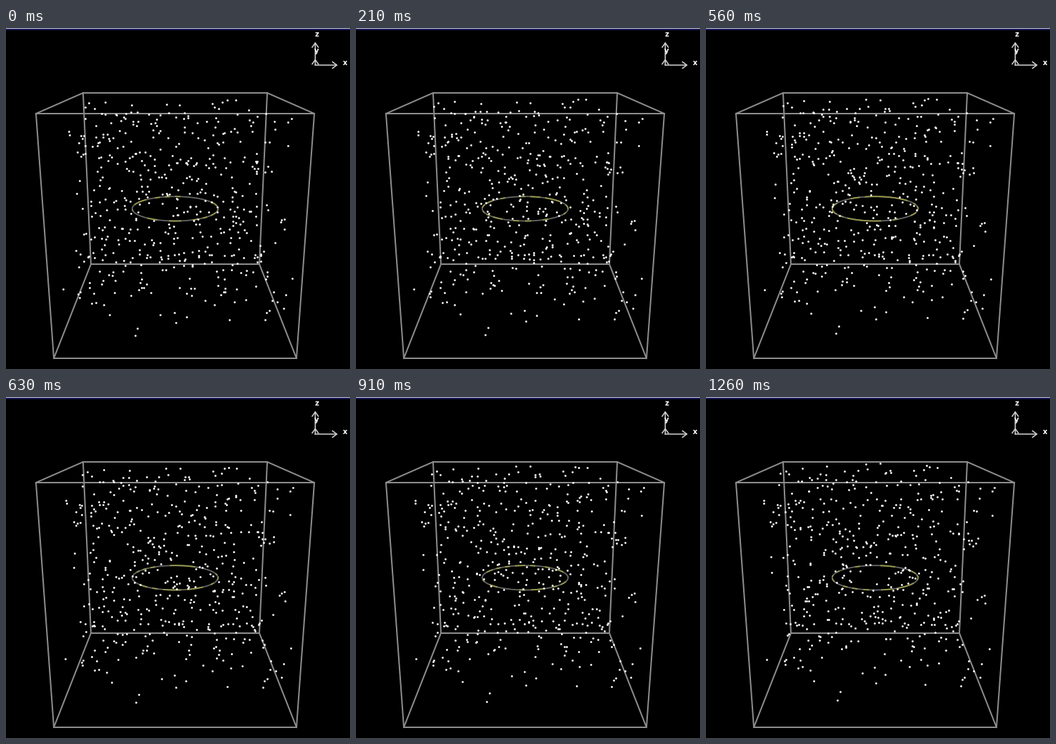
Animation of 482x478 px, one loop 1330 ms. Source, as a matplotlib script:

```python
import numpy as np
import matplotlib.pyplot as plt
from matplotlib.animation import FuncAnimation
from matplotlib.collections import LineCollection

W, H, DPI = 482, 478, 64
FRAMES, STEP_MS = 19, 70
COUNT = 500
RADIUS, STRENGTH, CORE = 0.204, 0.0115, 0.03
GREY, WHITE = "#8c8c8c", "#d4d4d4"
rng = np.random.default_rng(7)


def px(n):
    return n * 72 / DPI


def project(x, y, z):
    """Perspective of a unit cube centred on the origin, z upwards."""
    u, v = y + 0.5, 0.5 - z
    w = 0.002568 + 0.000369 * v + 0.001304 * u
    return 237 + x / w, (0.3081 + 1.052 * v + 0.043 * u) / w


# Ring of short current elements
phi = np.linspace(0, 2 * np.pi, 48, endpoint=False)
zero = np.zeros_like(phi)
ring = RADIUS * np.column_stack([np.cos(phi), np.sin(phi), zero])
ring_dl = RADIUS * phi[1] * np.column_stack([-np.sin(phi), np.cos(phi), zero])


def velocity(p):
    """Biot-Savart flow of the ring."""
    r = p[:, None] - ring
    d3 = ((r ** 2).sum(2) + CORE ** 2) ** 1.5
    return STRENGTH / (2 * np.pi) * (np.cross(ring_dl[None], r) / d3[..., None]).sum(1)


def advance(p, substeps=6):
    """One frame of Runge-Kutta steps."""
    h = 1 / substeps
    for _ in range(substeps):
        a = velocity(p)
        b = velocity(p + h / 2 * a)
        c = velocity(p + h / 2 * b)
        d = velocity(p + h * c)
        p = p + h / 6 * (a + 2 * b + 2 * c + d)
    return p


path = [rng.uniform((-0.48, -0.48, -0.44), (0.48, 0.48, 0.48), (COUNT, 3))]
for _ in range(FRAMES - 1):
    path.append(advance(path[-1]))

fig = plt.figure(figsize=(W / DPI, H / DPI), dpi=DPI, facecolor="black")
ax = fig.add_axes([0, 0, 1, 1])
ax.set(xlim=(0, W), ylim=(H, 0))
ax.axis("off")


def line(points, color=GREY, width=2):
    ax.plot(*zip(*points), color=color, lw=px(width),
            solid_joinstyle="miter", snap=False)


# Window edge along the top
ax.axhspan(0, 1, color="#c8c8d6", lw=0)
ax.axhspan(1, 3, color="#1c1c60", lw=0)

# Box
front = [(42, 120), (432, 120), (407, 463), (67, 463)]
back = [(108, 91), (366, 91), (355, 331), (119, 331)]
for face in (back, front):
    line(face + face[:1])
for edge in zip(front, back):
    line(edge)

# Axis triad
line([(433.3, 52), (433.3, 21)], WHITE, 1.5)
line([(433.3, 52), (463.5, 52)], WHITE, 1.5)
for tip in (21, 44.5):
    line([(429, tip + 6), (433.3, tip), (437.6, tip + 6)], WHITE, 1.5)
line([(457.5, 47.5), (463.5, 52), (457.5, 56.5)], WHITE, 1.5)
for label, x, y in (("z", 435, 8.5), ("y", 435.5, 32), ("x", 475.5, 48.5)):
    ax.text(x, y, label, color="white", size=px(10), weight="bold",
            family="DejaVu Sans", ha="center", va="center")

# Ring with flickering yellow stretches
t = np.linspace(0, 2 * np.pi, 97)
loop = np.column_stack(project(RADIUS * np.cos(t), RADIUS * np.sin(t), 0 * t))
loop += (0, 0.7)
line(loop, "#666666", 1.8)
pieces = np.stack([loop[:-1], loop[1:]], axis=1)
glow = LineCollection([], colors="#9c9c4a", linewidths=px(1.8))
ax.add_collection(glow)

dots, = ax.plot([], [], "o", color="white", ms=px(2.8), mew=0, zorder=5)


def draw(i):
    dots.set_data(*project(*path[i].T))
    lit = np.random.default_rng(i).random(48) < 0.5
    glow.set_segments(pieces[np.repeat(lit, 2)])
    return dots, glow


anim = FuncAnimation(fig, draw, frames=FRAMES, interval=STEP_MS, repeat=True, repeat_delay=0)
plt.show()
```
